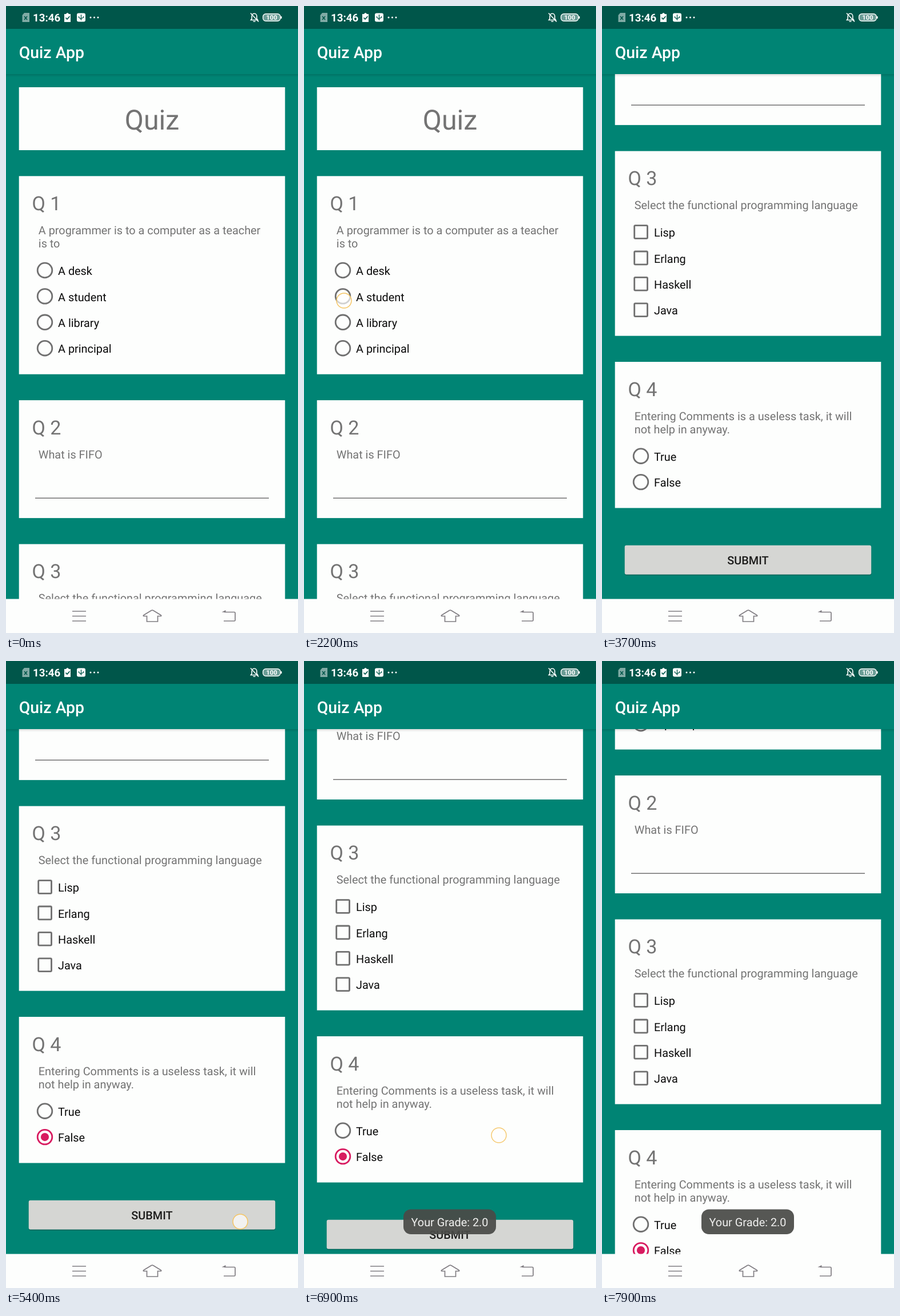
Write an HTML page that moves like this. It is 511 px wide and 1096 px high and loops after 8 s.

```html
<!DOCTYPE html>
<html lang="en">
<head>
<meta charset="utf-8">
<title>Quiz App</title>
<style>
html, body { margin: 0; width: 100%; height: 100%; overflow: hidden; background: #008474; }
svg { display: block; width: 511px; height: 1096px; font: 19.87px Roboto, sans-serif; text-rendering: geometricPrecision; }
.card, .nav { fill: #fdfefd; }
.head { font-size: 34.07px; }
.grey { fill: #737373; }
.option { fill: #0a0a0a; }
.mark { fill: none; stroke: #707070; stroke-width: 2.84px; }
.medium { font-weight: 500; }
.mid { text-anchor: middle; }
.line { fill: none; stroke: #807d82; stroke-width: 1.7px; }
.dot, .ripple { fill: #d81b60; transform-box: fill-box; transform-origin: center; }
.ripple { opacity: 0; }
[data-run] { animation: 8s step-end -4ms infinite; }
</style>
</head>
<body>
<svg viewBox="0 0 511 1096">
  <defs>
    <clipPath id="view"><rect y="119" width="511" height="917.5"/></clipPath>
    <linearGradient id="shade" x2="0" y2="1">
      <stop stop-color="#000" stop-opacity=".13"/><stop offset="1" stop-color="#000" stop-opacity="0"/>
    </linearGradient>
  </defs>
  <rect width="511" height="1096" fill="#008474"/>
  <g clip-path="url(#view)">
    <g id="page" data-run="scroll">
      <rect class="card" x="22.7" y="142" width="465.6" height="110"/>
      <text class="grey mid" x="255.5" y="216" font-size="48.3">Quiz</text>
      <g id="cards"></g>
      <rect x="40" y="1631.5" width="431" height="51" rx="3" fill="#000" opacity=".1"/>
      <rect x="39.5" y="1631" width="432" height="51" rx="3" fill="#000" opacity=".16"/>
      <rect x="39.7" y="1629.7" width="431.5" height="51" rx="3" fill="#d5d6d3"/>
      <rect data-run="press" x="39.7" y="1629.7" width="431.5" height="51" rx="3" opacity="0"/>
      <text class="medium mid" x="255.5" y="1663" fill="#1c1c1b">SUBMIT</text>
    </g>
  </g>
  <rect y="119" width="511" height="5" fill="url(#shade)"/>

  <rect width="511" height="40" fill="#00564a"/>
  <text class="medium" x="22.7" y="91" font-size="28.4" fill="#fff">Quiz App</text>
  <g fill="#fff">
    <path d="M32 12h9v16H28.500V16z" opacity=".5"/>
    <path d="M32 18l5 6m0-6l-5 6" stroke="#00564a" stroke-width="1.6"/>
    <text x="47" y="27" font-size="18.700" font-weight="700">13:46</text>
    <path d="M102 14h3q2.500-4 5 0h3v14h-11z"/>
    <path d="M104.500 20.500l2.500 2.500 4.500-5" fill="none" stroke="#00564a" stroke-width="1.700"/>
    <rect x="124" y="12.500" width="15" height="15" rx="3"/>
    <path d="M131.500 15v10m0-2l-4-3v-2m4 4l4-2v-2" fill="none" stroke="#00564a" stroke-width="1.300"/>
    <circle cx="148" cy="20" r="1.500"/><circle cx="154.500" cy="20" r="1.500"/><circle cx="161" cy="20" r="1.500"/>
    <g fill="none" stroke="#fff" stroke-width="1.600">
      <path d="M428.500 24.500h12l-1.700-2.500v-4.500a4.300 4.300 0 0 0-8.600 0V22zM432.500 27h4M428 12.500L442 27.500"/>
      <rect x="449.700" y="13.700" width="30.500" height="12.600" rx="5" fill="#fff" fill-opacity=".42" stroke-width="1.400"/>
      <path d="M481.800 18v4"/>
    </g>
    <text class="mid" x="465" y="24" font-size="11.200" font-weight="700">100</text>
  </g>

  <rect class="nav" y="1036.500" width="511" height="60"/>
  <g class="line">
    <path d="M116 1058h24M116 1066.500h24M116 1075h24"/>
    <path d="M246.500 1066.500h-5.500q-1.500-.5 0-1.700l13.500-8.200q1.500-.8 3 0l13.500 8.200q1.500 1.200 0 1.700h-5.500v9.500h-19z"/>
    <path d="M382 1059.500h17.500q1.500 0 1.500 1.500v12.500q0 1.500-1.500 1.500H381"/>
    <path d="M377.500 1059.500l7-3.500v4z" fill="#807d82" stroke="none"/>
  </g>

  <g data-run="toast" opacity="0">
    <rect x="174" y="958.500" width="162" height="43.500" rx="13" fill="#4a4b48" opacity=".93"/>
    <text class="mid" x="255" y="988" fill="#f0f0ef">Your Grade: 2.0</text>
  </g>
  <g data-run="touch" opacity="0">
    <circle r="13" fill="#fff" fill-opacity=".68" stroke="#f5c564" stroke-width="1.500"/>
  </g>
</svg>
<script>
const LOOP = 8000;
const rules = [];

// Turns {ms: declarations} into stepped keyframes.
function keys(name, steps) {
  const body = Object.entries(steps).map(([ms, css]) => `${ms / LOOP * 100}% {${css}}`).join(" ");
  rules.push(`@keyframes ${name} {${body}}`, `[data-run="${name}"] {animation-name: ${name}}`);
}
const mapValues = (steps, css) =>
  Object.fromEntries(Object.entries(steps).map(([ms, v]) => [ms, css(v)]));
const fade = (name, steps) => keys(name, mapValues(steps, v => `opacity: ${v}`));

const text = (cls, x, y, str) => `<text class="${cls}" x="${x}" y="${y}">${str}</text>`;

function mark(kind, y, pick) {
  if (kind === "check") return `<rect class="mark" x="56.7" y="${y - 11.4}" width="22.8" height="22.8" rx="1.6"/>`;
  const circle = (cls, r, run) => `<circle class="${cls}" cx="68" cy="${y}" r="${r}" ${run ? `data-run="${run}"` : ""}/>`;
  const ring = circle("mark", 12.8, pick && pick + "Ring");
  return pick ? circle("ripple", 28, pick + "Ripple") + ring + circle("dot", 7.1, pick + "Dot") : ring;
}

function card(n, top, height, lines, kind, options = [], picks = {}) {
  const first = top + 141.4 + (lines.length - 1) * 23.3;
  return `<rect class="card" x="22.7" y="${top}" width="465.6" height="${height}"/>` +
    text("head grey", 45.4, top + 59.5, "Q " + n) +
    lines.map((s, i) => text("grey", 56.8, top + 101.7 + i * 23.3, s)).join("") +
    options.map((s, i) => {
      const y = first + i * 45.4;
      return mark(kind, y, picks[s]) + text("option", 91, y + 8.1, s);
    }).join("");
}

document.getElementById("cards").innerHTML =
  card(1, 297.3, 346.4, ["A programmer is to a computer as a teacher", "is to"], "radio",
    ["A desk", "A student", "A library", "A principal"], { "A student": "student" }) +
  card(2, 689.1, 206, ["What is FIFO"]) +
  '<path d="M51 860.2h409" stroke="#707070" stroke-width="1.4"/>' +
  card(3, 940.6, 323, ["Select the functional programming language"], "check",
    ["Lisp", "Erlang", "Haskell", "Java"]) +
  card(4, 1309, 255.5, ["Entering Comments is a useless task, it will", "not help in anyway."], "radio",
    ["True", "False"], { False: "no" });

// Tap on a radio button: ripple, then the ring and dot turn on.
function tap(name, at) {
  fade(name + "Ripple", { 0: 0, [at + 100]: .06, [at + 200]: .14, [at + 300]: .16, [at + 400]: .11, [at + 500]: .06, [at + 600]: .02, [at + 700]: 0 });
  keys(name + "Ring", { 0: "stroke: #707070", [at + 200]: "stroke: #d81b60" });
  keys(name + "Dot", mapValues({ 0: 0, [at + 200]: .5, [at + 300]: 1 }, v => `transform: scale(${v})`));
}
tap("student", 2200);
tap("no", 4400);

keys("scroll", mapValues({
  0: 0, 3100: 506.6, 3200: 640, 3300: 687,
  6900: 653, 7000: 608, 7100: 560, 7200: 515, 7300: 480.5,
  7400: 478, 7500: 481, 7600: 486, 7700: 489
}, y => `transform: translateY(${-y}px)`));

keys("touch", mapValues({
  0: [70, 515, 0], 2200: [70, 515, 1], 2300: [70, 515, .7], 2400: [70, 515, 0],
  3000: [371, 900, .8], 3100: [379, 644, .9], 3200: [384, 560, .4], 3300: [384, 560, 0],
  4400: [70, 836, 1], 4500: [70, 836, .7], 4600: [70, 836, 0],
  5400: [410, 980, 1], 5500: [410, 980, .6], 5600: [410, 980, 0],
  6900: [341, 829, .9], 7000: [344, 864, .9], 7100: [348, 900, .9], 7200: [351, 933, .9],
  7300: [354, 960, .9], 7400: [354, 966, .7], 7500: [354, 963, .4], 7600: [354, 960, 0]
}, ([x, y, o]) => `transform: translate(${x}px, ${y}px); opacity: ${o}`));

fade("press", { 0: 0, 5500: .08, 5600: .1, 5700: .06, 5800: .02, 5900: 0 });
fade("toast", { 0: 0, 5600: .25, 5700: .6, 5800: .85, 5900: 1 });

const style = document.createElement("style");
style.textContent = rules.join("\n");
document.head.append(style);
</script>
</body>
</html>
```
